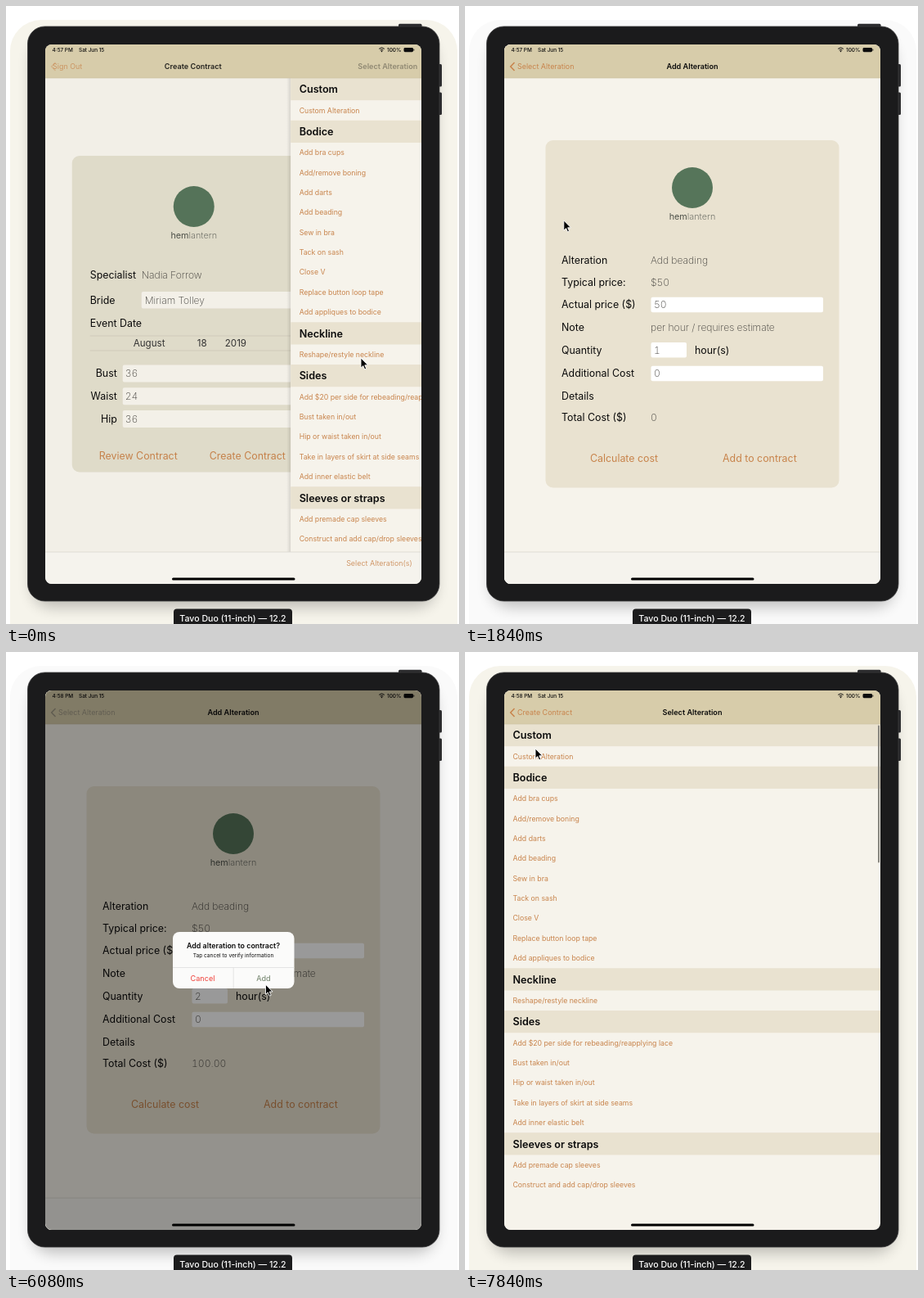
An HTML page for the animation above (7.92 s loop, 554 by 755 pixels).

```html
<!DOCTYPE html>
<html lang="en">
<head>
<meta charset="utf-8">
<title>Alteration contract demo</title>
<style>
html, body { margin: 0; width: 100%; height: 100%; overflow: hidden; background: #fff; }
svg { display: block; width: 554px; height: 755px; font-family: Inter, "Open Sans", sans-serif; }
text { white-space: pre; }
.value { font-weight: 200; font-variant-numeric: tabular-nums; }
</style>
</head>
<body>
<svg id="stage" viewBox="0 0 554 755"></svg>
<script>
const LOOP = 7920, STEP = 80, WIDTH = 461;
const PAPER = '#f6f3eb', CARD = '#e9e2d0', TINT = '#c8844c', INK = '#0c0c0c', SOFT = '#3f3d39';

// Drawing helpers; text is placed by its vertical centre.
const rect = (x, y, w, h, fill, more = '') =>
  `<rect x="${x}" y="${y}" width="${w}" height="${h}" fill="${fill}" ${more}/>`;
const text = (x, y, size, str, fill = INK, more = '') =>
  `<text x="${x}" y="${y + size * .36}" font-size="${size}" fill="${fill}" ${more}>${str}</text>`;
const line = (d, stroke, w = 1, more = '') =>
  `<path d="${d}" fill="none" stroke="${stroke}" stroke-width="${w}" ${more}/>`;
const group = (id, body, more = '') => `<g id="${id}" ${more}>${body}</g>`;
const label = (x, y, str) => text(x, y, 12.4, str);
const value = (x, y, str, id = '') => text(x, y, 12.1, str, SOFT, `class="value" id="${id}"`);
const button = (x, y, str, id = '') => text(x, y, 12.4, str, TINT, `id="${id}"`);
const field = (x, y, w, h = 18.5, fill = '#fff') => rect(x, y, w, h, fill, 'rx="2"');
const MID = 'text-anchor="middle"';

const brand = y => `<circle cx="278" cy="${y}" r="25" fill="#56755a"/>` +
  text(278, y + 35, 10.8, '<tspan font-weight="400">hem</tspan><tspan font-weight="300" fill="#77786f">lantern</tspan>', '#4d5149', MID);

const page = (id, body) => group(id,
  rect(43, 47, 5, 659, 'url(#edge)') + rect(48, 47, WIDTH, 659, PAPER) + body +
  rect(48, 88, WIDTH, 618, '#000', 'class="shade" opacity="0"'));

function contractPage() {
  const sizes = [['Bust', 36], ['Waist', 24], ['Hip', 36]];
  const fill = '#f7f4ec';
  return page('contract',
    rect(129, 183, 298, 386.5, '#e3decc', 'rx="9"') + brand(245) +
    label(151, 328.5, 'Specialist') + value(214, 328.5, 'Nadia Forrow') +
    label(151, 359.5, 'Bride') + field(214, 349, 193, 20.5, fill) + value(218, 359.5, 'Miriam Tolley') +
    label(151, 387.5, 'Event Date') +
    line('M151 403H407M151 421H407', '#cdc8b8', .8) +
    text(204, 412.3, 11.6, 'August', '#333') + text(282, 412.3, 11.6, '18', '#333') +
    text(316, 412.3, 11.6, '2019', '#333') +
    sizes.map(([name, n], i) => {
      const y = 449 + i * 27.7;
      return text(184, y, 12.4, name, INK, 'text-anchor="end"') +
        field(191, y - 10.5, 216, 21, fill) + value(194, y, n);
    }).join('') +
    button(162, 550, 'Review Contract') + button(297, 550, 'Create Contract'));
}

const SECTIONS = {
  'Custom': ['Custom Alteration'],
  'Bodice': ['Add bra cups', 'Add/remove boning', 'Add darts', 'Add beading', 'Sew in bra',
    'Tack on sash', 'Close V', 'Replace button loop tape', 'Add appliques to bodice'],
  'Neckline': ['Reshape/restyle neckline'],
  'Sides': ['Add $20 per side for rebeading/reapplying lace', 'Bust taken in/out',
    'Hip or waist taken in/out', 'Take in layers of skirt at side seams', 'Add inner elastic belt'],
  'Sleeves or straps': ['Add premade cap sleeves', 'Construct and add cap/drop sleeves']
};

function listPage() {
  let y = 88, rows = '', rules = '';
  for (const [head, items] of Object.entries(SECTIONS)) {
    rows += rect(48, y, WIDTH, 27.2, CARD) +
      text(58.5, y + 13.8, 12.6, head, INK, 'font-weight="600"');
    y += 27.4;
    for (const item of items) {
      if (item === 'Add beading') rows += rect(48, y, WIDTH, 24.3, '#d9d9da', 'id="picked"');
      rows += text(58.5, y + 12, 8.72, item, TINT);
      y += 24.35;
      rules += `M48 ${y}H509`;
    }
  }
  return page('list', `<g clip-path="url(#rows)">${rows}${line(rules, '#d8d5ca', .7, 'id="rules"')}</g>` +
    rect(505, 89.5, 2, 168, '#8a8881', 'rx="1" id="scroll"'));
}

function addPage() {
  const names = ['Alteration', 'Typical price:', 'Actual price ($)', 'Note', 'Quantity',
    'Additional Cost', 'Details', 'Total Cost ($)'];
  const ys = [311, 337.5, 365, 393, 420.5, 449, 476.5, 503];
  return page('add',
    rect(98.5, 164, 359, 424.5, CARD, 'rx="9"') + brand(222) +
    names.map((n, i) => label(118, ys[i], n)).join('') +
    value(227, ys[0], 'Add beading') + value(227, ys[1], '$50') +
    field(227.5, 355.7, 210.5) + value(231, ys[2], '50') +
    value(227, ys[3], 'per hour / requires estimate') +
    field(227.5, 411, 43.5) + value(231, ys[4], '1', 'qty') + label(281, ys[4], 'hour(s)') +
    rect(238, 412.5, 1.2, 15.5, '#45c5d2', 'id="caret"') +
    group('clear', '<circle cx="263.5" cy="420.5" r="4" fill="#c3c3c6"/>' +
      line('M262 419l3 3m0-3l-3 3', '#fff', .8)) +
    field(227.5, 439.8, 210.5) + value(231, ys[5], '0') + value(227, ys[7], '0', 'total') +
    button(153, 553, 'Calculate cost', 'calc') + button(315, 553, 'Add to contract', 'submit'));
}

function navBar() {
  const title = (id, str) => text(278, 74, 9.1, str, INK, `${MID} font-weight="600" id="${id}"`);
  const back = (id, x, str) => text(x, 74, 8.95, str, TINT, `id="${id}"`);
  const small = 'font-weight="500"';
  return rect(48, 47, WIDTH, 41, '#d7ccaa') + line('M48 88H509', '#c9bf9f', .6) +
    text(56.5, 53.4, 6.4, '4:57 PM', INK, small + ' id="clock"') + text(89, 53.4, 6.4, 'Sat Jun 15', INK, small) +
    line('M456.2 52.3q3.3-2.7 6.6 0M457.7 54q1.8-1.4 3.6 0', INK, 1) + '<circle cx="459.5" cy="55.4" r=".8"/>' +
    text(466, 53.4, 6.4, '100%', INK, small) +
    rect(486.5, 51, 11.5, 5.2, INK, 'rx="1.4"') + rect(498.4, 52.6, .9, 2, INK) +
    title('t0', 'Create Contract') + title('t1', 'Select Alteration') + title('t2', 'Add Alteration') +
    line('M60.5 69l-4.8 5 4.8 5', TINT, 1.5, 'id="chevron"') +
    `<g clip-path="url(#backClip)">${back('b0', 57, 'Sign Out')}</g>` +
    `<g clip-path="url(#labelClip)">${back('b1', 64, 'Create Contract')}${back('b2', 64, 'Select Alteration')}</g>`;
}

const undo = 'M64.5 679.5l-2.7 2.7 2.7 2.7M62 682.2h7.5a3 3 0 0 1 0 6.2h-5';
const keyBar = () => group('keys',
  rect(48, 667, WIDTH, 60, '#d2d4da') +
  line(undo, '#9a9ca2', 1.2, 'id="undo"') +
  line(undo, '#9a9ca2', 1.2, 'transform="matrix(-1 0 0 1 159.5 0)"') +
  line('M115.5 681v-2h7.5v7h-2M113.5 681h7v7.5h-7z', '#94969c') +
  line('M235 677v14M321 677v14M478 677v14', '#c2c4ca', .8) +
  line('M485.8 681.5l4.7 4.5 4.7-4.5', '#333', 1.3));

const alertBox = () => group('alert',
  rect(204, 342, 148.5, 69, '#fbfbfa', 'rx="8"') +
  text(278, 358.5, 8.9, 'Add alteration to contract?', INK, MID + ' font-weight="600"') +
  text(278, 370.8, 6.6, 'Tap cancel to verify information', INK, MID) +
  line('M204 385.5H352.5M278.2 385.5V411', '#dcdcdc', .7) +
  text(240.5, 399, 9.1, 'Cancel', '#f0413a', MID) + text(315, 399, 9.1, 'Add', '#6f8068', MID));

const clip = (id, x, y, w, h, r = 0) => `<clipPath id="${id}">${rect(x, y, w, h, '#000', `rx="${r}"`)}</clipPath>`;

const stage = document.getElementById('stage');
stage.innerHTML = `<defs>
  ${clip('screen', 48, 47, 460, 659, 8)}${clip('rows', 0, 88, 1100, 579)}
  ${clip('backClip', 50, 60, 200, 28)}${clip('labelClip', 60, 60, 200, 28)}
  <linearGradient id="edge"><stop stop-opacity="0"/><stop offset="1" stop-opacity=".11"/></linearGradient>
  <filter id="blur" x="-20%" y="-20%" width="140%" height="140%"><feGaussianBlur stdDeviation="9"/></filter></defs>` +
  rect(5, 17, 547, 790, '#fff', 'rx="38" id="halo"') +
  rect(32, 42, 493, 692, '#000', 'rx="24" opacity=".24" filter="url(#blur)"') +
  rect(480, 21.8, 28.5, 6, '#2b2b2d', 'rx="1.5"') +
  rect(527, 71, 6, 27.5, '#2b2b2d', 'rx="1.5"') + rect(527, 105.5, 6, 27.5, '#2b2b2d', 'rx="1.5"') +
  rect(26.5, 25, 503.5, 702, '#1b1b1c', 'rx="21" stroke="#3a3a3c" stroke-width=".8"') +
  `<g clip-path="url(#screen)">${contractPage()}${listPage()}${addPage()}` +
  group('tools', rect(48, 667, WIDTH, 40, '#f5f3ed') + line('M48 667H509', '#d9d6cd', .8)) +
  text(456.5, 681, 8.95, 'Select Alteration(s)', TINT, MID + ' id="pick"') +
  navBar() + keyBar() + rect(48, 47, WIDTH, 659, '#000', 'id="dim"') + alertBox() +
  rect(203, 698.5, 150.5, 3, '#000', 'rx="1.5"') + '</g>' +
  rect(205, 736.5, 145, 30, '#1c1c1d', 'rx="4"') +
  text(277.5, 748, 10.6, 'Tavo Duo (11-inch) — 12.2', '#fff', MID + ' font-weight="500"') +
  group('cursor', '<path d="M0 0V12.2L2.8 9.6L4.7 14L6.7 13.1L4.8 8.8H8.6Z" stroke="#fff" stroke-width=".9"/>');

const el = {};
stage.querySelectorAll('[id]').forEach(n => el[n.id] = n);
const shade = id => el[id].querySelector('.shade');

const clamp = v => Math.max(0, Math.min(1, v));
const ramp = (t, a, b) => clamp((t - a) / (b - a));
const spring = (t, start) => {
  const w = Math.max(0, t - start) * .014;
  return w > 7 ? 1 : 1 - (1 + w) * Math.exp(-w);
};
const fade = (n, o) => n.setAttribute('opacity', clamp(o));
const move = (n, x, y = 0, more = '') => n.setAttribute('transform', `translate(${x} ${y}) ${more}`);
const during = (t, a, b) => t >= a && t < b;

// time, x, y
const PATH = [[0, 434, 430], [320, 434, 430], [1120, 115, 255], [1760, 115, 255], [2400, 250, 418],
  [2640, 252, 419], [2880, 267, 421], [3680, 267, 421], [4080, 205, 550], [4400, 205, 552],
  [4640, 290, 566], [4800, 351, 553], [4960, 358, 547], [5440, 358, 547], [6000, 318, 408],
  [6240, 316, 401], [6560, 316, 401], [7040, 291, 406], [7280, 291, 406], [7760, 86, 118], [7920, 86, 118]];

function pointer(t) {
  const i = PATH.findIndex(p => p[0] > t), a = PATH[i - 1], b = PATH[i];
  const u = ramp(t, a[0], b[0]), e = u * u * (3 - 2 * u);
  return [a[1] + (b[1] - a[1]) * e, a[2] + (b[2] - a[2]) * e];
}

const POP = 6956;

function draw(t) {
  const popping = t >= POP;
  const p1 = spring(t, -88);
  const p2 = spring(t, 1327) * (1 - spring(t, POP));

  // Pages: the front one slides, the one behind follows at 30 %.
  move(el.contract, -p1 * WIDTH * .3);
  move(el.list, p1 < 1 ? (1 - p1) * WIDTH : -p2 * WIDTH * .3);
  move(el.add, (1 - p2) * WIDTH);
  fade(el.add, p2 > 0 ? 1 : 0);
  fade(shade('contract'), .05 * p1);
  fade(shade('list'), .1 * p2);
  fade(el.rules, p2 * 4);
  fade(el.picked, during(t, 1200, POP) ? 1 : popping ? 1 - ramp(t, 7100, 7440) : 0);
  fade(el.scroll, ramp(t, 400, 560) - ramp(t, 1040, 1280) + ramp(t, 7360, 7520));
  fade(el.tools, popping ? 0 : 1);
  fade(el.pick, 1 - p1 * p1 * 1.5);

  // Navigation bar
  move(el.t0, -141 * p1);
  fade(el.t0, 1 - p1 * p1);
  move(el.t1, p1 < 1 ? 290 * (1 - p1) : -p2 * (popping ? 203 : 153));
  fade(el.t1, p1 * (1 - p2 * p2));
  move(el.t2, (1 - p2) * (popping ? 238 : 287));
  fade(el.t2, p2);
  fade(el.chevron, p1);
  fade(el.b0, 1 - p1 * p1 * 2);
  move(el.b1, -72 * p2);
  fade(el.b1, ramp(p1, .7, 1) * (popping ? 1 - p2 * 4 : 1 - p2 * .8) * (p2 > .97 ? 0 : 1));
  fade(el.b2, ramp(p2, .7, 1));
  el.clock.textContent = t < 3600 ? '4:57 PM' : '4:58 PM';

  // Form
  const focus = during(t, 2600, 5360) || during(t, 6560, POP);
  el.qty.textContent = t < 3360 ? '1' : t < 3520 ? '' : '2';
  el.total.textContent = t < 4320 ? '0' : '100.00';
  fade(el.caret, focus && (t - 2600) % 1000 < 600 ? 1 : 0);
  fade(el.clear, focus && el.qty.textContent ? 1 : 0);
  fade(el.calc, during(t, 4240, 4400) ? .3 : 1);
  fade(el.submit, during(t, 5120, 5280) ? .3 : 1);
  const up = spring(t, 2600) - spring(t, 5360) + spring(t, 6560) - spring(t, POP);
  move(el.keys, 0, 39.5 * (1 - up));
  fade(el.keys, up > .005 ? 1 : 0);
  el.undo.setAttribute('stroke', t < 3360 ? '#9a9ca2' : '#222');

  // Alert
  const shown = ramp(t, 5360, 5560) - ramp(t, 6320, 6520);
  const scale = 1 + .15 * (1 - ramp(t, 5360, 5600));
  fade(el.dim, .4 * shown);
  fade(el.alert, shown);
  move(el.alert, 278, 376.5, `scale(${scale}) translate(-278 -376.5)`);
  const tint = shown > .3 ? '#a09a86' : TINT;
  el.b2.setAttribute('fill', tint);
  el.chevron.setAttribute('stroke', tint);

  el.halo.setAttribute('fill', during(t, 1200, POP) ? '#fafafa' : '#f6f4eb');
  move(el.cursor, ...pointer(t));
}

const begin = performance.now();
function tick() {
  const t = (performance.now() - begin) % LOOP;
  draw(Math.floor(t / STEP) * STEP);
  requestAnimationFrame(tick);
}
tick();
</script>
</body>
</html>
```
